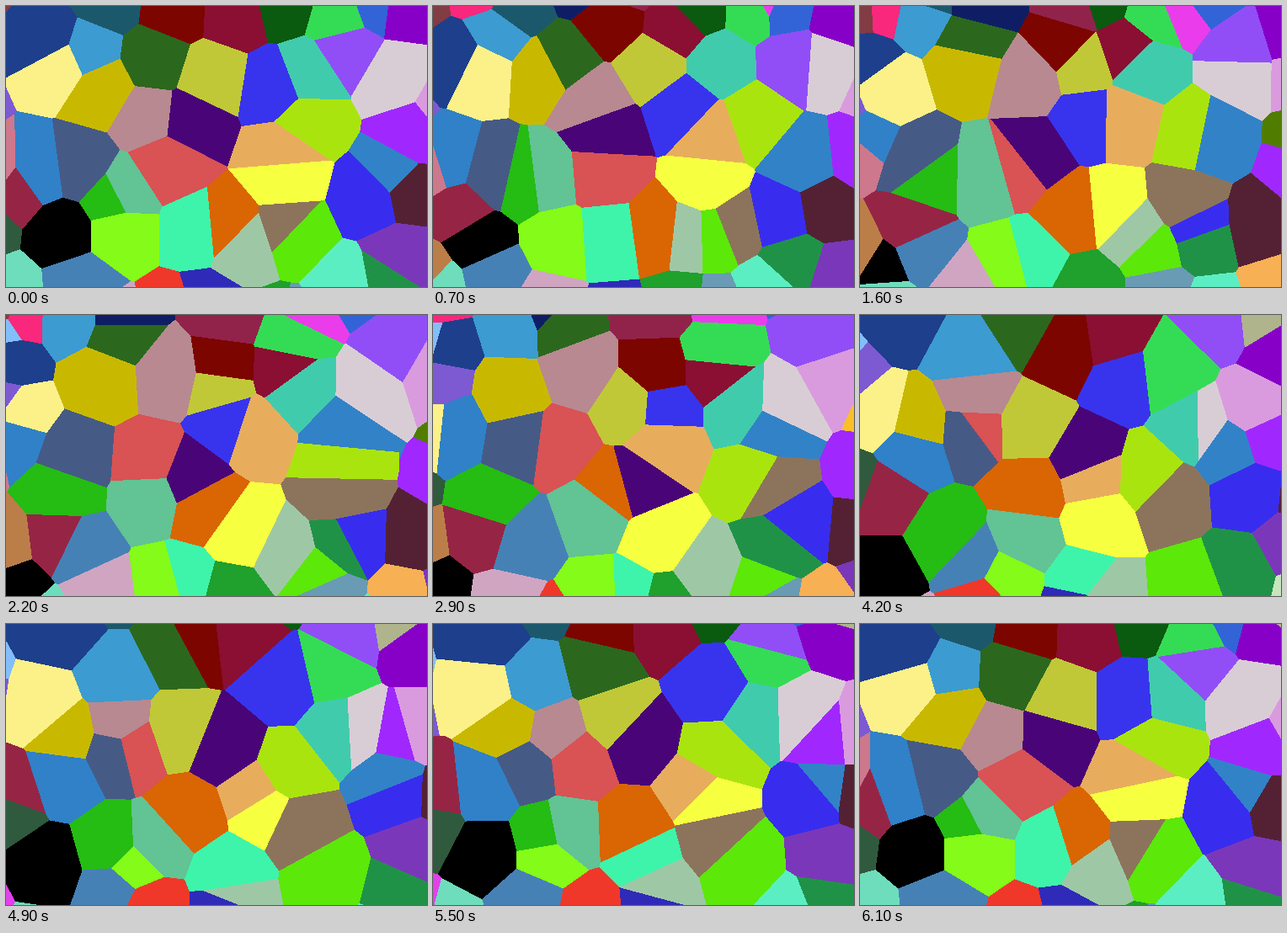
Recreate the animation shown at these times as an HTML page with a canvas. Size 500 px wide and 334 px high, loop 6200 ms.

```html
<!DOCTYPE html>
<html lang="en">
<head>
<meta charset="utf-8">
<title>Drifting Voronoi cells</title>
<style>
  html, body { margin: 0; width: 100%; height: 100%; overflow: hidden; }
  canvas { display: block; }
</style>
</head>
<body>
<canvas id="stage" width="500" height="334"></canvas>
<script>
const W = 500, H = 334, CELL = H / 5;
const STEP_MS = 100, STEPS = 62, START = 1.8;

// One colour per lattice square, with a one-square margin around the stage.
// Red and green also set the phase of the seed's horizontal and vertical swing,
// unless a separate phase pair follows the colon.
const lattice = `
  823c44:aa32 fa287d 1c586c 0f1e64 91234b 0a5a0f eb3ceb 3264d7 afb48c -
  82befa 1e3f8c 3c9bd0 2b681e 7d0500 8a0f32 34dc55:08d3 914ef7 8700c8 -
  7d5ad2 fbf188 c8b900 b88990 c1c837 3834ee:1c34 41cbad d9cdd5 d99bde fabe28
  cd788c 3081c8 465a86 d95254 490578 e7ad5d aae40f 3282c8:1282 a028ff 507d00
  2f5a3d 962545 25bc14:11bc 62c394 da6503 f6ff40 8c745c 382dee 542134 -
  bb7e49 000000 4681b6 84fb18 3ef4aa 9ec8a5 5ce808 209248 7b37b9 c8e6be
  e141eb 6eddbc d0a5c2 f0382a 302ab9 20a02d 699bb4 5ceec3 f7b054 -
`.trim().split('\n').map((line, row) => line.trim().split(' ').map((entry, col) => {
  if (entry === '-') return null;
  const [color, phase = color] = entry.split(':');
  const byte = (hex, i) => parseInt(hex.slice(2 * i, 2 * i + 2), 16);
  const [r, g, b] = [0, 1, 2].map(i => byte(color, i));
  return {
    row, col,
    phaseX: byte(phase, 0),
    phaseY: byte(phase, 1),
    rgba: (255 << 24 | b << 16 | g << 8 | r) >>> 0
  };
}));

const ctx = document.getElementById('stage').getContext('2d');
const image = ctx.createImageData(W, H);
const pixels = new Uint32Array(image.data.buffer);
const swing = (time, phase) => CELL / 2 * Math.sin(time + 2 * Math.PI * phase / 255);

function moveSeeds(time) {
  for (const seed of lattice.flat()) {
    if (!seed) continue;
    seed.x = (seed.col - 0.5) * CELL + swing(time, seed.phaseX);
    seed.y = (seed.row - 0.5) * CELL - swing(time, seed.phaseY);
  }
}

// Seeds stay inside their square, so the 3 by 3 neighbourhood is enough.
function nearby(col, row) {
  return lattice.slice(row, row + 3)
    .flatMap(line => line.slice(col, col + 3))
    .filter(Boolean);
}

function draw(step) {
  moveSeeds(START + step * 0.1);
  for (let row = 0; row * CELL < H; row++) {
    for (let col = 0; col * CELL < W; col++) {
      const seeds = nearby(col, row);
      const right = Math.min(W, (col + 1) * CELL);
      const bottom = Math.min(H, (row + 1) * CELL);
      for (let y = Math.floor(row * CELL); y < bottom; y++) {
        for (let x = Math.floor(col * CELL); x < right; x++) {
          let best = Infinity, color = 0;
          for (const seed of seeds) {
            const dx = seed.x - x - 0.5, dy = seed.y - y - 0.5;
            const distance = dx * dx + dy * dy;
            if (distance < best) { best = distance; color = seed.rgba; }
          }
          pixels[y * W + x] = color;
        }
      }
    }
  }
  ctx.putImageData(image, 0, 0);
}

let shown = -1;
const begin = performance.now();
function tick() {
  const step = Math.floor((performance.now() - begin) / STEP_MS) % STEPS;
  if (step !== shown) draw(shown = step);
  requestAnimationFrame(tick);
}
tick();
</script>
</body>
</html>
```
